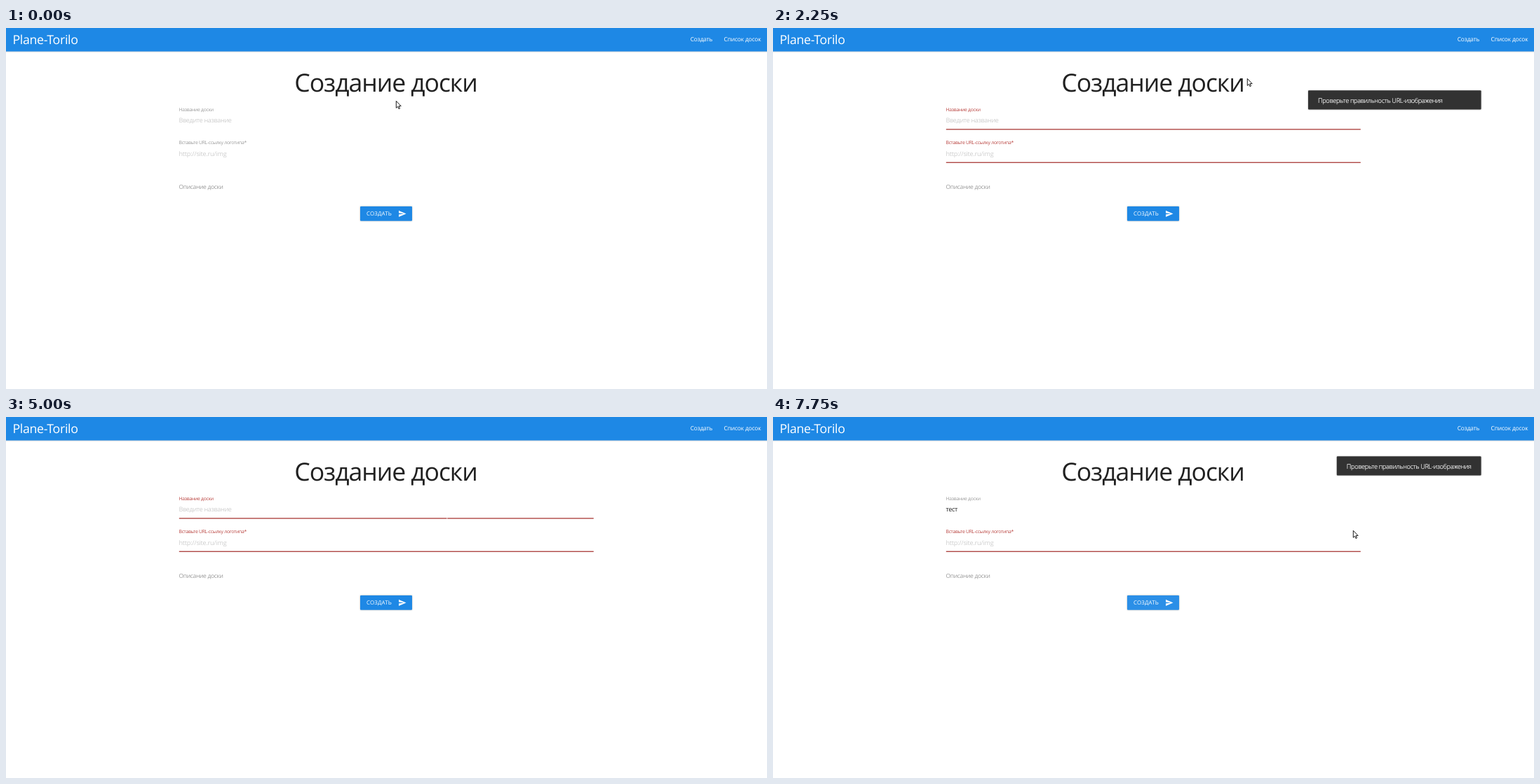
These frames come from a looping animation (1085 by 516 pixels, 8000 ms). An HTML page:

```html
<!DOCTYPE html>
<html lang="ru">
<head>
<meta charset="utf-8">
<title>Создание доски</title>
<style>
  html, body { margin: 0; width: 100%; height: 100%; overflow: hidden; background: #fff; }
  svg { display: block; width: 1085px; height: 516px; }
  text {
    font-family: "Open Sans", "Noto Sans", sans-serif;
    letter-spacing: -.036em;
    text-rendering: geometricPrecision;
    white-space: pre;
  }
  .bar, .btn, .toast rect { filter: drop-shadow(0 .8px .8px rgba(0, 0, 0, .3)); }
  .bar, .btn { fill: #1e88e5; }
  .logo { font-size: 17.8px; fill: #fff; letter-spacing: -.02em; }
  .link { font-size: 8.475px; font-weight: 450; fill: #fff; letter-spacing: -.022em; }
  .title { font-size: 35.6px; fill: #212121; text-anchor: middle; letter-spacing: -.03em; }
  .label { font-size: 6.78px; fill: #999; }
  .hint { font-size: 9.04px; fill: #cdcdcd; }
  .url { letter-spacing: -.025em; }
  .value { font-size: 9.04px; fill: #212121; }
  .desc { font-size: 8.475px; fill: #999; }
  .btn-text { font-size: 7.91px; font-weight: 450; fill: #fff; letter-spacing: .02em; }
  .line { fill: #ad413e; visibility: hidden; }
  .invalid .label { fill: #b8403d; }
  .invalid .line { visibility: visible; }
  .toast rect { fill: #323232; }
  .toast text {
    font-size: 9.2px; font-weight: 300; letter-spacing: -.037em;
    fill: #fff; stroke: #fff; stroke-width: .15px;
  }
  .pointer { fill: #fff; stroke: #000; stroke-width: 1.5; stroke-linejoin: round; }
</style>
</head>
<body>
<svg viewBox="0 0 1085 516">
  <defs>
    <clipPath id="btnClip"><rect x="505" y="255" width="74" height="20.8" rx="1.1"/></clipPath>
  </defs>

  <rect class="bar" x="-5" y="-5" width="1095" height="38.5"/>
  <text class="logo" x="9.5" y="22.8">Plane-Torilo</text>
  <text class="link" x="975.7" y="18.7">Создать</text>
  <text class="link" x="1023.5" y="18.7">Список досок</text>
  <text class="title" x="541.5" y="91">Создание доски</text>

  <g id="nameField">
    <text class="label" x="246.5" y="119">Название доски</text>
    <text class="hint" id="nameHint" x="246.5" y="135.3">Введите название</text>
    <text class="value" id="nameValue" x="246.5" y="135.3"></text>
    <rect class="line" x="246.8" y="144.2" width="591"/>
  </g>
  <g id="urlField">
    <text class="label" x="246.5" y="166.3">Вставьте URL-ссылку логотипа*</text>
    <text class="hint url" x="246.5" y="183">http://site.ru/img</text>
    <rect class="line" x="246.8" y="191.6" width="591"/>
  </g>
  <text class="desc" x="246.5" y="230.2">Описание доски</text>
  <rect id="caret" y="126" width="1" height="11.5" fill="#333"/>

  <rect class="btn" x="505" y="255" width="74" height="20.8" rx="1.1"/>
  <circle id="ripple" cx="571" cy="262" fill="#fff" clip-path="url(#btnClip)"/>
  <text class="btn-text" x="514" y="268.2">СОЗДАТЬ</text>
  <path transform="translate(559 259.4) scale(.5)" fill="#fff" d="M2 21L23 12 2 3V10L17 12 2 14Z"/>

  <g class="toast" id="toastName"><rect height="27.3" rx="1.1"/><text x="14" y="17.6">Проверьте правильность заполнения названия доски</text></g>
  <g class="toast" id="toastUrl"><rect height="27.3" rx="1.1"/><text x="14" y="17.6">Проверьте правильность URL-изображения</text></g>

  <path class="pointer" id="arrow" d="M0 0V16.5L3.8 13 6.2 18.7 8.8 17.5 6.4 12H11.5Z"/>
  <path class="pointer" id="hand" d="M5 1.8c0-2 3-2 3 0V8c1-1 3-.8 3 .5 1-1 3-.6 3 .8 1-.8 2.8-.3 2.8 1.2V15c0 3-2 4-2 6.8H6.5C6 19 2 15 .8 12.5c-.8-1.6 1-2.6 2.3-1.3L5 13Z"/>
  <rect id="beam" x="628.5" y="140" width=".8" height="10" fill="#fff"/>
</svg>
<script>
  const LOOP = 8000, TICK = 250;
  const $ = id => document.getElementById(id);
  const within = (t, a, b) => t >= a && t < b;
  const show = (el, on) => { el.style.visibility = on ? 'visible' : 'hidden'; };
  const clamp = v => Math.min(1, Math.max(0, v));

  // Linear track through [time, ...values] points
  function track(points, t) {
    const i = points.findIndex(p => p[0] > t);
    if (i < 0) return points[points.length - 1].slice(1);
    if (i === 0) return points[0].slice(1);
    const a = points[i - 1], b = points[i], k = (t - a[0]) / (b[0] - a[0]);
    return a.slice(1).map((v, n) => v + (b[n + 1] - v) * k);
  }

  const pointerPath = [
    [0, 556, 104], [750, 568, 258], [1250, 568, 258], [1500, 650, 185],
    [1750, 826, 72], [2000, 776, 72], [2250, 676, 72], [2750, 835, 78],
    [3000, 840, 75], [3250, 848, 75], [3500, 900, 75], [3750, 970, 124],
    [4250, 650, 143], [6500, 618, 149], [7000, 568, 258], [7250, 568, 258],
    [7500, 700, 212], [7750, 827, 162]
  ];
  const rippleTrack = [[0, 30, .15], [160, 63, .28], [410, 100, .16], [660, 100, .06], [910, 100, 0]];
  const clicks = [840, 7090];

  function drawToast(el, on, t, born, width, top, dx) {
    show(el, on);
    if (!on) return;
    const rest = Math.pow(1 - clamp((t - born) / 300), 3);
    el.firstChild.setAttribute('width', width);
    el.setAttribute('transform', `translate(${1009.6 - width + dx} ${top + 19.8 * rest})`);
    el.setAttribute('opacity', 1 - Math.abs(dx) / (width * .8));
  }

  function drawRipple(t) {
    const start = clicks.filter(c => c <= t).pop();
    const [r, opacity] = start === undefined ? [0, 0] : track(rippleTrack, t - start);
    $('ripple').setAttribute('r', r);
    $('ripple').setAttribute('opacity', opacity);
  }

  function drawFields(t) {
    $('nameField').classList.toggle('invalid', within(t, 1000, 7250));
    $('urlField').classList.toggle('invalid', t >= 1000);
    const weight = .6 + .75 * clamp((t - clicks[0]) / 300);
    for (const line of document.querySelectorAll('.line')) line.setAttribute('height', weight);

    const typed = t < 5500 ? '' : t < 6000 ? 'те' : 'тест';
    $('nameValue').textContent = typed;
    show($('nameHint'), !typed);
    show($('caret'), within(t, 4500, 5000) || within(t, 5500, 6500));
    $('caret').setAttribute('x', 246.8 + typed.length * 4.15);
  }

  function drawPointer(t) {
    const [x, y] = track(pointerPath, t);
    const typing = within(t, 4500, 6500);
    const hand = within(t, 750, 1500) || within(t, 7000, 7500);
    show($('beam'), typing);
    show($('hand'), hand);
    show($('arrow'), !typing && !hand);
    for (const id of ['hand', 'arrow'])
      $(id).setAttribute('transform', `translate(${x + .3} ${y + .4}) scale(.6)`);
  }

  function draw(now) {
    const t = Math.floor(now % LOOP / TICK) * TICK;
    drawFields(t);
    drawRipple(t);
    drawPointer(t);
    const [nameDx] = track([[1750, 0], [2000, -50]], t);
    drawToast($('toastName'), within(t, 1000, 2250), t, clicks[0], 246.6, 56.3, nameDx);
    const again = t >= clicks[1], alone = t >= 2750;
    const [urlDx] = again ? [0] : track([[3000, 0], [3250, 8], [3500, 60]], t);
    drawToast($('toastUrl'), within(t, 1000, 3750) || again, t, clicks[again ? 1 : 0],
      alone ? 205.8 : 246.6, alone ? 56.3 : 89.2, urlDx);
  }

  let start;
  function frame(now) {
    start ??= now;
    draw(now - start);
    requestAnimationFrame(frame);
  }
  draw(0);
  requestAnimationFrame(frame);
</script>
</body>
</html>
```
